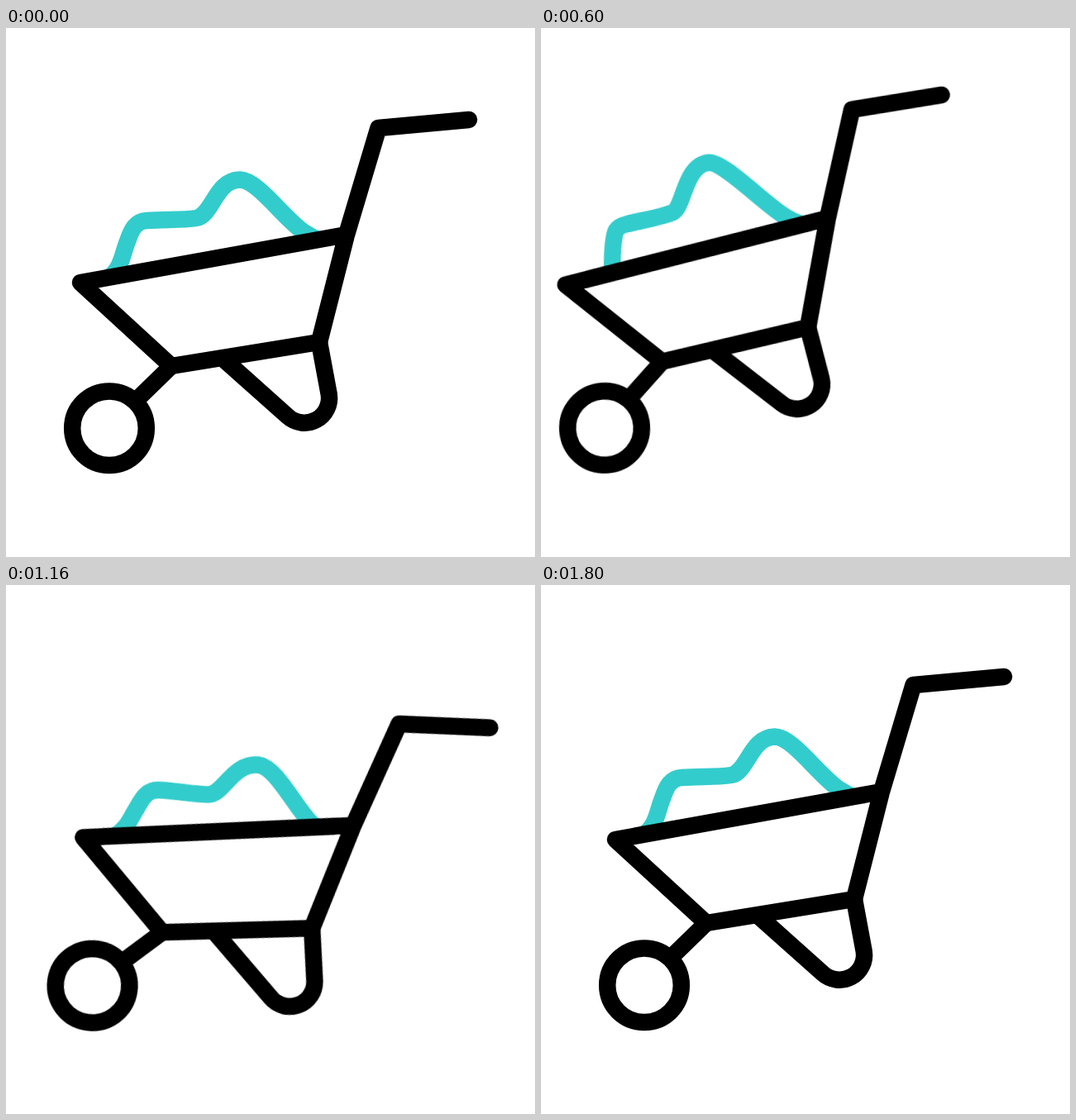
An HTML page without scripts for the animation above (2 s loop, 640 by 640 pixels).

```html
<!DOCTYPE html>
<html lang="en">
<head>
<meta charset="utf-8">
<title>Wheelbarrow</title>
<style>
  html, body { margin: 0; width: 100%; height: 100%; overflow: hidden; background: #fff; }
  svg { display: block; width: 100vw; height: 100vh; }

  .cart, .tilt, .load {
    animation: 2s cubic-bezier(.333, 0, .667, 1) infinite;
  }
  .cart { animation-name: roll; }
  .tilt { animation-name: tilt; transform-origin: 121px 484px; }
  .load { animation-name: sway; }

  .frame, .load {
    fill: none;
    stroke-width: 20.5;
    stroke-linecap: round;
    stroke-linejoin: round;
  }
  .frame { stroke: #000; }
  .load { stroke: #33cccc; }

  @keyframes roll {
    0%, 4% { transform: translateX(0); }
    30% { transform: translateX(-48px); }
    48% { transform: translateX(4.5px); }
    66.5% { transform: translateX(-39.5px); }
    90%, 100% { transform: translateX(0); }
  }

  @keyframes tilt {
    0%, 4% { transform: rotate(0deg); }
    30% { transform: rotate(-4.04deg); }
    48% { transform: rotate(8.94deg); }
    90%, 100% { transform: rotate(0deg); }
  }

  /* The load leans back, slumps forward, lifts a little and settles */
  @keyframes sway {
    0%, 4%, 90%, 100% {
      d: path("M124 302 C140 292 141 272 147 258 C152 243 157 234 170 233 C190 231 212 233 230 230 C250 227 253 184 283 183.5 C305 184 337 232 362 248 C368 252 374 255 380 257");
    }
    30% {
      d: path("M146.6 306 C147.3 296 148.7 276 151 263 C153.8 247.4 155 242.5 169.3 240 C187.6 236.8 207.7 235.2 225.2 230 C239.5 225.4 243.5 173.5 273.3 172.7 C291.3 173 334.7 225.2 359.7 243.5 C366.2 248.5 373 252 380 255");
    }
    48% {
      d: path("M128.6 302 C143.3 291.5 147 283 152.6 273 C158.8 260 162.3 250.2 176.2 248.2 C196 246.2 218.5 247 238.6 246 C255.5 244.4 262.8 215 294.4 209.8 C317.3 207 336.8 240.3 356.9 259.6 C361.7 265 368.5 270 375.2 274");
    }
    66.5% {
      d: path("M124 302 C140 292 141 272 147 258 C152 243 157 233 170 232 C190 230 212 232 229 229 C248 226 252 180 282 179.5 C304 180 337 231 362 248 C368 252 374 255 380 257");
    }
  }
</style>
</head>
<body>
<svg viewBox="0 0 640 640">
  <defs>
    <clipPath id="above"><path d="M90 308 L412 250 V0 H0 V324 Z"/></clipPath>
  </defs>
  <g class="cart">
    <g class="tilt">
      <g clip-path="url(#above)">
        <path class="load" d="M124 302 C140 292 141 272 147 258 C152 243 157 234 170 233 C190 231 212 233 230 230 C250 227 253 184 283 183.5 C305 184 337 232 362 248 C368 252 374 255 380 257"/>
      </g>
      <g class="frame">
        <path d="M560 111 L450.5 121 L412 250 L379 380 L200 409 L90 308 L412 250"/>
        <path d="M379 380 L390.7 443 A30 30 0 0 1 341 470 L262 399.5"/>
        <path d="M200 409 L161 447"/>
        <circle cx="125" cy="484.2" r="44.8"/>
      </g>
    </g>
  </g>
</svg>
</body>
</html>
```
